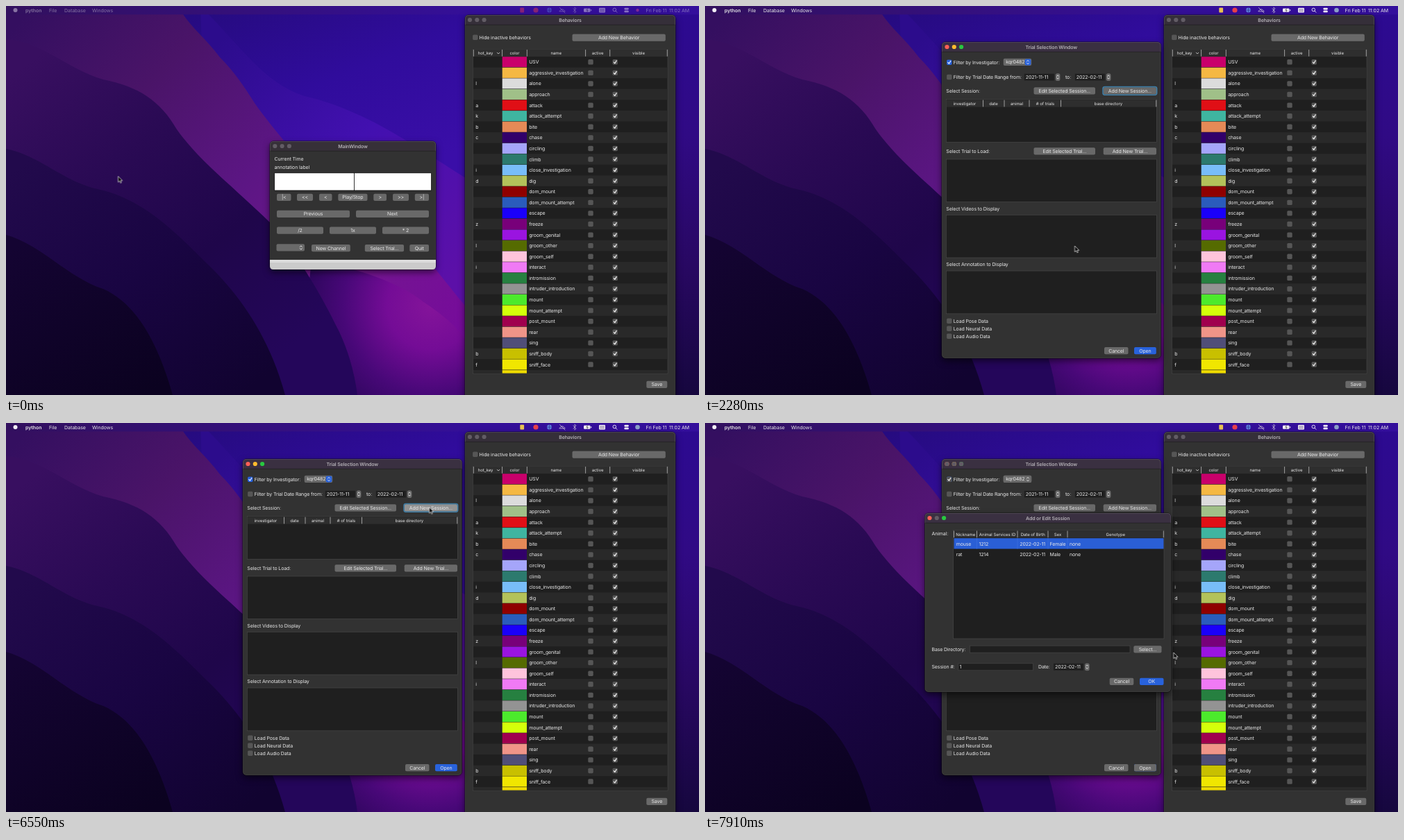
An HTML page that plays this animation: 998x561 px, repeating every 8 s.

```html
<!DOCTYPE html>
<html lang="en">
<head>
<meta charset="utf-8">
<title>Trial selection walkthrough</title>
<style>
html, body { margin: 0; width: 100%; height: 100%; overflow: hidden; background: #180540; }
svg { display: block; width: 100%; height: 100%; }
text {
  font: 7px Inter, "Liberation Sans", sans-serif; letter-spacing: -.13px;
  fill: #e9e9e9; text-rendering: geometricPrecision; white-space: pre;
}
.mid { text-anchor: middle; }
.bold { font-weight: 600; }
.title { font-weight: 600; fill: #b4b0b6; }
.head { font-size: 6px; letter-spacing: -.04px; }
.menu { letter-spacing: -.05px; }
.win { filter: drop-shadow(0 4px 5px #0008); }

.timed { animation: 8s step-end infinite; }
.idle { animation-name: idle; }
.active { animation-name: active; }
.press { animation-name: press; }
.trial { animation-name: trial; }
.ring { animation-name: ring; }
.popup { animation-name: popup; }
.press2 { animation-name: press2; }
.blur { animation-name: blur; }
.session { animation-name: session; transform-origin: 493.5px 259px; }
.focus { animation-name: focus; }
.caret { animation-name: caret; }
.typed { animation-name: typed; }
.picked { animation-name: picked; }
.cursor { animation: cursor 8s linear infinite; }

@keyframes idle { 0% { opacity: 1 } 15.5%, 100% { opacity: 0 } }
@keyframes active { 0% { opacity: 0 } 15.5%, 100% { opacity: 1 } }
@keyframes press { 0% { opacity: 0 } 24.375% { opacity: 1 } 28.5%, 100% { opacity: 0 } }
@keyframes trial { 0% { opacity: 0 } 28.5%, 100% { opacity: 1 } }
@keyframes ring { 0% { opacity: 1 } 48.25% { opacity: 0 } 58.5% { opacity: 1 } 84%, 100% { opacity: 0 } }
@keyframes popup {
  0% { opacity: 0 } 48.25% { opacity: 1 } 58.5% { opacity: .5 }
  59.37% { opacity: .1 } 60.5%, 100% { opacity: 0 }
}
@keyframes press2 { 0% { opacity: 0 } 81.87% { opacity: 1 } 84%, 100% { opacity: 0 } }
@keyframes blur { 0% { opacity: 0 } 84%, 100% { opacity: 1 } }
@keyframes session {
  0% { opacity: 0; transform: scale(.88) }
  84% { opacity: .5; transform: scale(.88) }
  85% { opacity: .85; transform: scale(.93) }
  85.87% { opacity: .96; transform: scale(.963) }
  86.87% { opacity: 1; transform: scale(.985) }
  87.87%, 100% { opacity: 1; transform: none }
}
@keyframes focus { 0% { opacity: 1 } 94.87%, 100% { opacity: 0 } }
@keyframes caret { 0% { opacity: 1 } 88.87%, 100% { opacity: 0 } }
@keyframes typed { 0% { opacity: 0 } 88.87%, 100% { opacity: 1 } }
@keyframes picked { 0% { opacity: 0 } 94.87%, 100% { opacity: 1 } }
@keyframes cursor {
  0%, 1.61% { transform: translate(161.5px, 245.5px) }
  1.62% { transform: translate(178.5px, 258px) }
  3.37% { transform: translate(178.5px, 258px); animation-timing-function: steps(3, start) }
  6.37% { transform: translate(421.5px, 274px) }
  7.37% { transform: translate(421.5px, 274px); animation-timing-function: steps(6, start) }
  13.25% { transform: translate(460px, 202.5px) }
  18.25% { transform: translate(460px, 202.5px); animation-timing-function: steps(3, start) }
  21.25% { transform: translate(527px, 344.5px) }
  23.37% { transform: translate(527px, 344.5px); animation-timing-function: steps(1, start) }
  24.37% { transform: translate(532.5px, 346px) }
  29.5% { transform: translate(532.5px, 346px); animation-timing-function: steps(2, start) }
  31.3% { transform: translate(435.5px, 240px) }
  32.37% { transform: translate(435.5px, 240px); animation-timing-function: steps(2, start) }
  34.37% { transform: translate(425.5px, 168px); animation-timing-function: steps(1, start) }
  35.37% { transform: translate(435.5px, 146.5px) }
  37.37% { transform: translate(435.5px, 146.5px); animation-timing-function: steps(4, start) }
  41.37% { transform: translate(487.5px, 134.5px) }
  44.62% { transform: translate(487.5px, 134.5px); animation-timing-function: steps(4, start) }
  48.62% { transform: translate(454.5px, 76.5px) }
  54.37% { transform: translate(454.5px, 76.5px); animation-timing-function: steps(2, start) }
  56.3% { transform: translate(454.5px, 77.3px) }
  60.5% { transform: translate(454.5px, 77.3px); animation-timing-function: steps(3, start) }
  63.3% { transform: translate(578.5px, 136px) }
  65.5% { transform: translate(578.5px, 136px); animation-timing-function: steps(5, start) }
  70.5% { transform: translate(609.5px, 121.5px) }
  89.87% { transform: translate(609.5px, 121.5px); animation-timing-function: steps(5, start) }
  94.87% { transform: translate(457px, 175.5px) }
  98% { transform: translate(457px, 175.5px); animation-timing-function: steps(2, start) }
  99.7%, 100% { transform: translate(674.8px, 331px) }
}
</style>
</head>
<body>
<svg id="stage" viewBox="0 0 998 561" preserveAspectRatio="none"></svg>
<script>
const GREY = '#696969', BLUE = '#2862dc', DARK = '#1f1f1f', BODY = '#323232';
const USERS = ['kqr0482', 'kqr0519'];

const rect = (x, y, w, h, fill, more = '') =>
  `<rect x="${x}" y="${y}" width="${w}" height="${h}" fill="${fill}" ${more}/>`;
const line = (d, stroke, width = 1) =>
  `<path d="${d}" fill="none" stroke="${stroke}" stroke-width="${width}" stroke-linecap="round" stroke-linejoin="round"/>`;
const dot = (x, y, r, fill) => `<circle cx="${x}" cy="${y}" r="${r}" fill="${fill}"/>`;
// y is the middle of the capitals
const text = (x, y, s, cls = '') =>
  `<text x="${x}" y="${y + 2.5}" class="${cls}">${s.replace(/</g, '&lt;')}</text>`;
const mid = (x, y, s, cls = '') => text(x, y, s, 'mid ' + cls);
const layer = (name, ...parts) => `<g class="timed ${name}">${parts.join('')}</g>`;

const button = (x1, x2, y, label, fill = GREY) =>
  rect(x1, y - 5, x2 - x1, 10.2, fill, 'rx="2"') + mid((x1 + x2) / 2, y, label);
const check = (x, y, on, fill = '#565656') =>
  rect(x - 3.7, y - 3.7, 7.4, 7.4, fill, 'rx="1.6"') +
  (on ? line(`M${x - 1.9} ${y + .2}l1.5 1.8l2.4 -4`, '#fff', 1.1) : '');
const chevrons = (x, y) =>
  line(`M${x - 1.5} ${y - 1.1}l1.5 -1.6l1.5 1.6M${x - 1.5} ${y + 1.1}l1.5 1.6l1.5 -1.6`, '#eee', .9);
const combo = (x, y, label, arrows = GREY) =>
  rect(x, y - 5, 40.5, 10.3, GREY, 'rx="2"') + rect(x + 31, y - 4.3, 8.6, 8.9, arrows, 'rx="1.8"') +
  chevrons(x + 35.3, y + .2) + text(x + 3.5, y, label);
const dateBox = (x, y, date) =>
  rect(x, y - 4.8, 43, 9.8, DARK) + text(x + 2, y, date) +
  rect(x + 45, y - 5.3, 6.6, 10.8, GREY, 'rx="2.5"') + chevrons(x + 48.3, y);
const panel = (x1, x2, y1, y2) =>
  rect(x1, y1, x2 - x1, y2 - y1, DARK, 'stroke="#464646" stroke-width=".7"');
const header = (x1, x2, y, labels, marks) =>
  rect(x1, y - 5.2, x2 - x1, 10.4, '#2e2e2e') +
  labels.map(([s, x]) => mid(x, y, s, 'head')).join('') +
  marks.map(x => line(`M${x} ${y - 4.5}v9`, '#bbb', .8)).join('');

const lights = (x, y, colors = []) =>
  [0, 1, 2].map(i => dot(x + i * 10.3, y, 3.1, colors[i] || '#625c65')).join('');
const LIT = ['#ff5f57', '#febc2e', '#28c840'];
const frame = (x, y, w, h, title, bar) =>
  `<g class="win">${rect(x, y, w, h, BODY, 'rx="5" stroke="#000" stroke-opacity=".7"')}</g>` +
  `<path d="M${x} ${y + 14}v-9q0-5 5-5h${w - 10}q5 0 5 5v9z" fill="${bar}"/>` +
  line(`M${x} ${y + 14.2}h${w}`, '#1c1a1d', .6) +
  rect(x + .4, y + .4, w - .8, h - .8, 'none', 'rx="4.6" stroke="#fff" stroke-opacity=".2" stroke-width=".6"') +
  mid(x + w / 2, y + 7, title, 'title');

function wallpaper() {
  const stops = list => list.map((c, i) => `<stop offset="${i / (list.length - 1)}" stop-color="${c}"/>`).join('');
  const grad = (id, x1, y1, x2, y2, ...colors) =>
    `<linearGradient id="${id}" gradientUnits="userSpaceOnUse" x1="${x1}" y1="${y1}" x2="${x2}" y2="${y2}">${stops(colors)}</linearGradient>`;
  const radial = (id, x, y, r, ...colors) =>
    `<radialGradient id="${id}" gradientUnits="userSpaceOnUse" cx="${x}" cy="${y}" r="${r}">${stops(colors)}</radialGradient>`;
  const hill = (d, id) => `<path d="${d}" fill="url(#${id})"/>`;
  return '<defs>' +
    grad('sky', 300, 0, 420, 300, '#260b80', '#300c9c', '#3a0ea8') +
    grad('side', 0, 0, 0, 561, '#2c0a92', '#300a84', '#280862', '#16073e') +
    grad('glow', 300, 60, 640, 400, '#2c0c8c', '#4210b0', '#5c10a8') +
    grad('plum', 40, 0, 620, 540, '#340f60', '#4a1468', '#5c1684', '#741690', '#760a9c') +
    radial('rose', 612, 432, 190, '#84149a', '#740c96', '#480878', '#290658') +
    grad('dusk', 60, 60, 400, 500, '#380f60', '#2a0a54', '#1f064a', '#24065a') +
    grad('night', 60, 200, 340, 560, '#220a4c', '#190542', '#110330') +
    grad('deep', 60, 320, 200, 561, '#140432', '#0b0220') +
    grad('bar', 0, 0, 998, 0, '#32105e', '#34107a', '#340f98', '#340f9c') +
    '</defs>' + rect(0, 0, 998, 561, 'url(#sky)') + rect(900, 0, 98, 561, 'url(#side)') +
    hill('M280 0C340 60 370 110 430 130C520 150 600 210 665 250V561H300Z', 'glow') +
    hill('M0 0H248C262 28 286 44 308 74C330 96 344 118 358 140C372 160 384 174 400 194C460 240 540 290 590 345C620 380 650 420 668 440V561H0Z', 'plum') +
    hill('M440 366C500 376 570 400 600 426C630 446 650 462 668 490V561H420Z', 'rose') +
    hill('M0 48C50 50 90 92 140 106C190 116 222 136 246 178C280 226 330 262 390 322C440 390 460 430 480 470C494 500 502 530 506 561H0Z', 'dusk') +
    hill('M0 206C46 214 84 254 132 264C196 278 240 322 290 372C340 420 380 480 402 561H0Z', 'night') +
    hill('M0 330C50 344 90 392 140 408C190 430 220 490 240 561H0Z', 'deep');
}

function menuBar() {
  const white = '#f2eef6';
  const icons =
    dot(763, 6, 3.6, '#e8414a') +
    dot(782.5, 6, 3.4, '#5d7fe0') + line('M779 6h7M782.5 2.6v6.8', '#2c2a80', .6) +
    line('M797 7.5q4 -6 8 0zM797.5 2.5l7.5 7.5', '#c8bfd6', .8) +
    line('M817 3.8l4 4.4l-2 2v-8.4l2 2l-4 4.4', '#c8bfd6', .7) +
    rect(832, 3.5, 9.5, 5.2, white, 'rx="1.3"') + rect(842.2, 5, 1, 2.2, white) + line('M837.4 3.8l-1.4 2.4h2.2l-1.4 2.2', '#333', .7) +
    rect(854, 2.8, 9, 6.6, white, 'rx="1"') + line('M855.5 5h6M855.5 7.2h6', '#44306a', .7) +
    `<circle cx="876.3" cy="5.4" r="2.3" fill="none" stroke="${white}" stroke-width=".9"/>` + line('M878 7.2l2 2', white, .9) +
    rect(890.3, 2.7, 6.6, 2.7, white, 'rx="1.3"') + rect(890.3, 6.6, 6.6, 2.7, white, 'rx="1.3"');
  const words = text(28, 6, 'python', 'bold menu') + text(62, 6, 'File', 'menu') +
    text(84, 6, 'Database', 'menu') + text(124, 6, 'Windows', 'menu') +
    text(921.5, 6, 'Fri Feb 11\u00a0 11:02 AM', 'menu');
  const all = dot(13.5, 6, 3, white) + words + icons;
  return rect(0, 0, 998, 12.3, 'url(#bar)') +
    layer('idle', `<g opacity=".45">${all}${rect(740.3, 2.5, 5.8, 7, '#f03a50', 'rx="1"')}${dot(909.5, 6, 2.2, '#e0508a')}</g>`) +
    layer('active', all, rect(740.3, 2.5, 5.8, 7, '#e8c352', 'rx="1"'), dot(909.5, 6, 3.3, '#8c9fc8'));
}

// name, swatch, hot key
const BEHAVIORS = `USV c9006b
aggressive_investigation f5b843
alone dcdcdc l
approach a0c088
attack e00f16 a
attack_attempt 3fb5a0 k
bite e58a57 b
chase 32006a c
circling a5a5fa
climb 2c7a6e
close_investigation 78bdf8 i
dig b3c25a d
dom_mount 8f0000
dom_mount_attempt 2a5cbc
escape 1a00fa
freeze 78007a z
groom_genital 9a14e0
groom_other 556b00 l
groom_self ffc4dc
interact f07af5 i
intromission 268040
intruder_introduction 939393
mount 4cea2c
mount_attempt d4ff0a
post_mount a0004e
rear f09488
sing 504e78
sniff_body c8c000 b
sniff_face f0e600 f`.split('\n').map(s => s.split(' '));

function behaviors() {
  const step = 15.58;
  const rows = BEHAVIORS.map(([name, color, key = ''], i) => {
    const top = 73 + i * step, y = top + 7.8;
    return (i % 2 ? rect(673, top, 279.5, step, '#292929') : '') +
      rect(714.7, top + .2, 35.3, step - .5, '#' + color) + text(676.3, y, key) + text(753.2, y, name) +
      check(842, y, false) + check(877.2, y, true);
  }).join('');
  return frame(661, 13, 303, 570, 'Behaviors', '#352f39') + lights(668, 20) +
    check(675.8, 45.2, false) + text(681.5, 45.2, 'Hide inactive behaviors') +
    button(815.5, 949.8, 45.5, 'Add New Behavior') +
    panel(672.3, 953, 62.3, 530) +
    header(672.8, 952.6, 67.8, [['hot_key', 690.5], ['color', 732.5], ['name', 792.3], ['active', 852], ['visible', 911]],
      [673.3, 714.6, 750.3, 834.6, 869.7, 952.3]) +
    line('M707.3 67.2l1.8 1.8l1.8 -1.8', '#ddd', .8) + rows +
    rect(673, 525, 279.5, 4.7, '#292929') + rect(714.7, 525.2, 35.3, 4.4, '#f0dc00') +
    button(922.3, 952.3, 545.8, 'Save');
}

function mainWindow() {
  const y = 275.8;
  return frame(380, 195, 239, 185, 'MainWindow', '#363038') +
    '<path d="M380 366h239v9q0 5-5 5h-229q-5 0-5-5z" fill="#cbcbcb"/>' + rect(380, 366, 239, 4, '#dcdcdc') +
    lights(387.3, 202) + text(386.5, 220, 'Current Time') + text(386.5, 232.3, 'annotation label') +
    rect(386.7, 240.8, 225.8, 25.2, '#fff', 'stroke="#000" stroke-width=".7"') + line('M501.5 241v25', '#000', .8) +
    button(390, 410.5, y, '|<') + button(419, 442, y, '<<') + button(451, 469.5, y, '<') +
    button(478.3, 520.5, y, 'Play/Stop') + button(529.3, 548, y, '>') + button(557, 580, y, '>>') +
    button(588.8, 609, y, '>|') +
    button(390, 495, 299.7, 'Previous') + button(504, 609, 299.7, 'Next') +
    button(390, 457, 323.5, '/2') + button(466, 533, 323.5, '1x') + button(542, 609, 323.5, '* 2') +
    combo(389.5, 348.3, '') + button(440, 495.8, 349, 'New Channel') +
    button(516.8, 573, 349, 'Select Trial...') + button(581.3, 609, 349, 'Quit') +
    layer('active', lights(387.3, 202, LIT), combo(389.5, 348.3, '', BLUE)) +
    layer('press', button(516.8, 573, 349, 'Select Trial...', '#8c8c8c'));
}

function trialWindow() {
  const add = fill => button(573.7, 650, 122.3, 'Add New Session...', fill);
  return layer('trial',
    frame(341, 52, 315.5, 456, 'Trial Selection Window', '#3a3041'), lights(348.5, 59, LIT),
    check(351.8, 81.2, true, BLUE), text(357.7, 81.3, 'Filter by Investigator:'), combo(429.7, 80.8, USERS[0], BLUE),
    check(351.8, 102.5, false), text(357.7, 102.5, 'Filter by Trial Date Range from:'),
    dateBox(459.8, 102.5, '2021-11-11'), text(519, 102.5, 'to:'), dateBox(532.8, 102.5, '2022-02-11'),
    text(347.3, 122.3, 'Select Session:'), button(473.5, 562, 122.3, 'Edit Selected Session...'), add(),
    layer('press2', add('#929292')),
    layer('ring', rect(573, 116.6, 77.7, 11.6, 'none', 'rx="2.6" stroke="#3f7fa8" stroke-width="1.5"')),
    panel(347.3, 650.5, 134.3, 196.3),
    header(347.8, 650, 140.5,
      [['investigator', 374], ['date', 415.5], ['animal', 449], ['# of trials', 490], ['base directory', 581]],
      [400.5, 431, 467, 512.5, 649.8]),
    text(347.3, 209.3, 'Select Trial to Load:'),
    button(473.5, 562, 209.2, 'Edit Selected Trial...'), button(573.7, 650, 209.2, 'Add New Trial...'),
    panel(347.3, 650.5, 221, 282.6), text(347.3, 292.5, 'Select Videos to Display'),
    panel(347.3, 650.5, 301.3, 363), text(347.3, 372.8, 'Select Annotation to Display'),
    panel(347.3, 650.5, 382, 443.8),
    ['Pose', 'Neural', 'Audio'].map((s, i) =>
      check(351.8, 454.2 + i * 11, false) + text(357.7, 454.2 + i * 11, `Load ${s} Data`)).join(''),
    button(575, 609.5, 497, 'Cancel'), button(618, 649.8, 497, 'Open', BLUE),
    layer('blur', lights(348.5, 59), check(351.8, 81.2, true), combo(429.7, 80.8, USERS[0]),
      button(618, 649.8, 497, 'Open')),
    layer('popup', rect(422.5, 73.3, 54, 24.5, '#2b2630', 'rx="3" stroke="#5a5560" stroke-width=".6"'),
      rect(425, 75.6, 49, 10.4, BLUE, 'rx="2"'), line('M427 81l1.3 1.5l2 -3.4', '#fff', .9),
      text(433.2, 80.8, USERS[0]), text(433.2, 91, USERS[1])));
}

function sessionWindow() {
  const row = (y, cells) => cells.map((s, i) => text([361.7, 394.5, 453.3, 496.5, 525][i], y, s)).join('');
  return layer('session',
    frame(316.5, 130, 354.5, 258, 'Add or Edit Session', '#3a3041'), lights(323.5, 137, [LIT[0], '', LIT[2]]),
    text(326.5, 159.5, 'Animal:'), panel(357.6, 661, 154.3, 311),
    layer('picked', rect(358.5, 166.2, 302, 15.3, '#2a5fd6'),
      [391.5, 450, 494, 522].map(x => line(`M${x} 166.4v14.8`, '#3d70de', .7)).join('')),
    header(358, 660.6, 160.4,
      [['Nickname', 375.2], ['Animal Services ID', 421], ['Date of Birth', 472.2], ['Sex', 508], ['Genotype', 591.3]],
      [358.5, 391.5, 450, 494, 522, 660.3]),
    row(174, ['mouse', '1212', '2022-02-11', 'Female', 'none']),
    row(189.4, ['rat', '1214', '2022-02-11', 'Male', 'none']),
    text(326.5, 326.2, 'Base Directory:'), panel(381.5, 612, 321.2, 331.2), button(617.3, 657.5, 326.2, 'Select...'),
    text(326.5, 351.7, 'Session #:'), panel(364.8, 472.6, 346.8, 356.8),
    layer('focus', rect(364.4, 346.4, 108.6, 10.8, 'none', 'rx="1" stroke="#3b82ae" stroke-width="1.6"')),
    layer('caret', line('M367 348.3v7', '#ddd', .6)), layer('typed', text(366.6, 351.7, '1')),
    text(480, 351.7, 'Date:'), dateBox(502, 351.7, '2022-02-11'),
    button(582.7, 617.3, 372.8, 'Cancel'), button(626, 660.5, 372.8, 'OK', BLUE));
}

const pointer = '<g class="cursor"><path d="M0 0V8.6L2 6.8L3.4 9.8L4.8 9.2L3.5 6.3H6.2Z" fill="#0a0a0a" stroke="#f4f4f4" stroke-width=".7" stroke-linejoin="round"/></g>';

document.getElementById('stage').innerHTML =
  wallpaper() + menuBar() + behaviors() + mainWindow() + trialWindow() + sessionWindow() + pointer;
</script>
</body>
</html>
```
